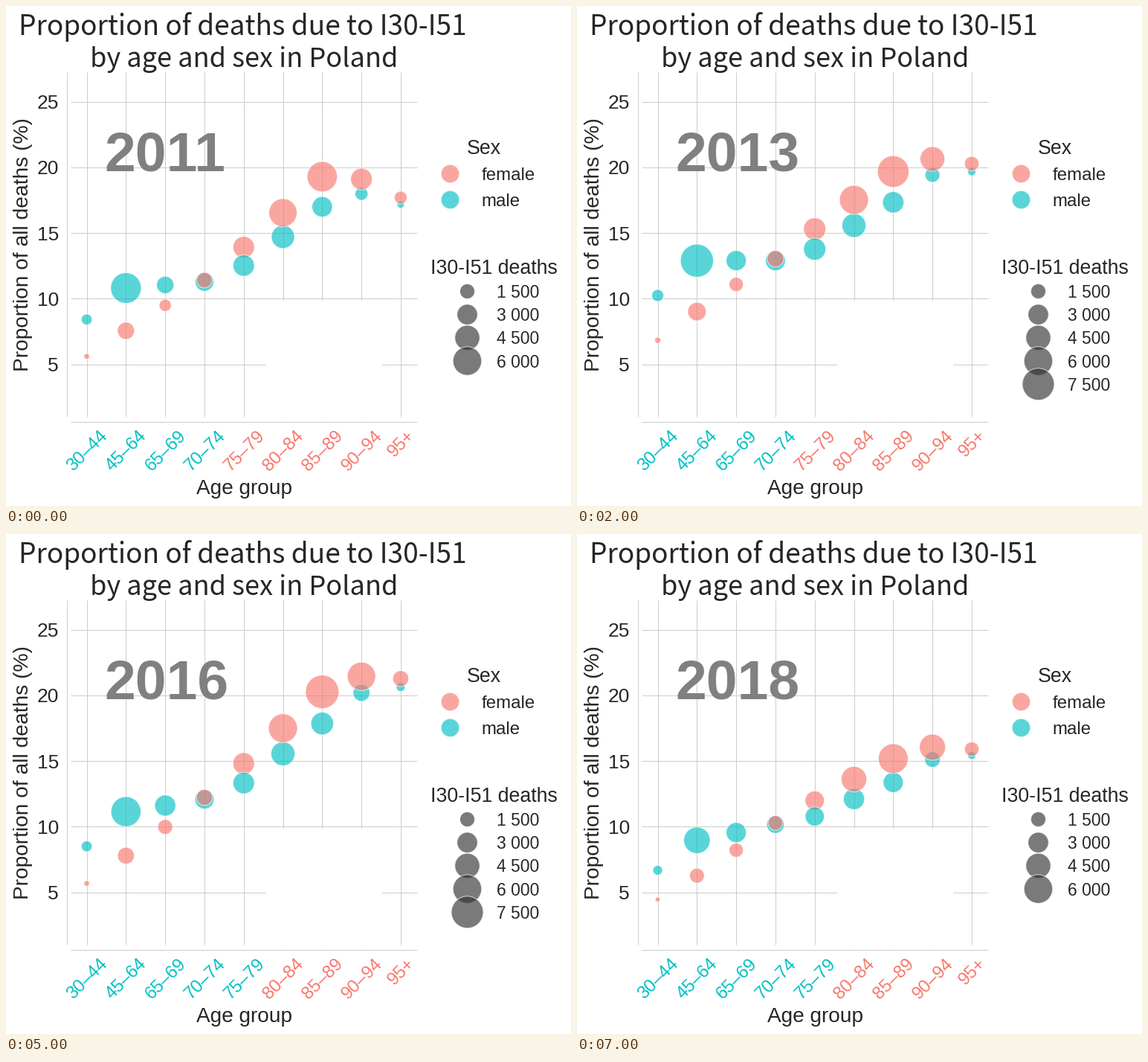
A matplotlib script that plays this animation: 760 px wide and 672 px high, repeating every 8000 ms.

```python
import numpy as np
import matplotlib.pyplot as plt
from matplotlib.animation import FuncAnimation
from matplotlib.patches import Circle, Rectangle

W, H, DPI = 760, 672, 100
PT = 72 / DPI
INK, GRID, GREY = "#262626", "#cccccc", "#808080"
FEMALE, MALE = "#F8766D", "#00BFC4"
ALPHA = 0.65

AGES = ["30–44", "45–64", "65–69", "70–74", "75–79",
        "80–84", "85–89", "90–94", "95+"]
AGE = np.arange(len(AGES))
XS = 108.55 + 52.8 * AGE
MALE_IN_FRONT = AGES.index("75–79")

# Typical share of deaths (%) by age index, straight between key points.
MALE_SHARE = np.interp(AGE, [0, 1, 3, 4, 7, 8],
                       [9.15, 11.8, 12.4, 13.4, 19.2, 19.3])
FEMALE_SHARE = np.interp(AGE, [0, 3, 6, 7, 8], [6.1, 12.55, 19.6, 20.4, 19.9])

# Yearly factor on the typical share, at the ages SWING_AT.
SWING_AT = [0, 3, 6, 8]
SWING = {
    2011: (0.92, 0.91, 0.985, 0.89),
    2012: (1.06, 1.025, 1.04, 1.065),
    2014: (1.18, 1.055, 0.97, 0.975),
    2015: (1.17, 1.22, 1.205, 1.215),
    2016: (0.93, 0.975, 1.035, 1.07),
    2018: (0.73, 0.82, 0.775, 0.80),
}

# Bubble area per share point, and how it grows per year around 2014.
MALE_AREA = np.array([6.3, 37.5, 15.2, 13.8, 16, 16.6, 12.2, 5.5, 1.6])
FEMALE_AREA = np.array([2.5, 16.8, 8.8, 9.5, 14.5, 21.6, 23.5, 14.5, 4.9])
GROWTH = np.array([0, -0.015, 0.065, 0, -0.01, 0, 0.03, 0.08, 0.05])


def swing(year):
    keys = [np.interp(year, list(SWING), k) for k in zip(*SWING.values())]
    return np.interp(AGE, SWING_AT, keys)


def radii(share, area, year):
    return np.sqrt(share * area * (1 + GROWTH * (year - 2014)))


def share_y(share):
    return 569.75 - 17.63 * share


def deaths_to_radius(deaths):
    return np.sqrt(10 + 0.0602 * deaths)


def radius_to_deaths(radius):
    return (radius ** 2 - 10) / 0.0602


fig = plt.figure(figsize=(W / 100, H / 100), dpi=DPI, facecolor="white")
ax = fig.add_axes([0, 0, 1, 1])
ax.set_xlim(0, W)
ax.set_ylim(H, 0)
ax.axis("off")


def text(x, y, s, px, color=INK, font="Liberation Sans", va="baseline", **kw):
    return ax.text(x, y, s, fontsize=px * PT, color=color, family=font,
                   va=va, **kw)


def line(x0, y0, x1, y1):
    ax.plot([x0, x1], [y0, y1], color=GRID, lw=PT, zorder=1,
            solid_capstyle="butt")


def bubble(x, y, r, color):
    return ax.add_patch(Circle((x, y), r, facecolor=color, edgecolor="white",
                               lw=1.1 * PT, alpha=ALPHA, zorder=4))


# Grid, spines and axis labels
for x in XS:
    line(x, 89, x, 551.5)
for share in range(5, 30, 5):
    y = share_y(share)
    line(87, y, 552.5, y)
    text(71, y + 9.3, str(share), 26.4, ha="right")
line(81.5, 89, 81.5, 551.5)
line(87, 558.7, 552.5, 558.7)
ax.add_patch(Rectangle((350, 396), 156, 155.5, color="white", lw=0, zorder=2))

text(318.5, 38.5, "Proportion of deaths due to I30-I51", 37.1,
     font="Noto Sans CJK JP", ha="center")
text(320, 81.5, "by age and sex in Poland", 36.1,
     font="Noto Sans CJK JP", ha="center")
text(320, 656.5, "Age group", 28, ha="center")
text(30, 320.5, "Proportion of all deaths (%)", 28.1, ha="center",
     rotation=90, rotation_mode="anchor")
age_labels = [text(x + 1, 566.5, age, 24, va="top", ha="center", rotation=45)
              for x, age in zip(XS, AGES)]
year_label = text(132.5, 221.3, "", 75, GREY, weight="bold")

# Legends
text(619.5, 199, "Sex", 26.7)
for y, name, color in [(225.5, "female", FEMALE), (260.5, "male", MALE)]:
    bubble(597.5, y, 12.3, color)
    text(639.5, y + 8.5, name, 24)
text(570.6, 360, "I30-I51 deaths", 26.7)

moving = []


def draw_size_legend(peak):
    step = 2000 if peak > 9000 else 1500
    for i, deaths in enumerate(range(step, int(peak) + 1, step)):
        y = 383.5 + 31.2 * i
        moving.append(bubble(620.5, y, deaths_to_radius(deaths), "#333333"))
        label = f"{deaths:,}".replace(",", " ")
        moving.append(text(659.5, y + 8.5, label, 22.9))


def update(frame):
    while moving:
        moving.pop().remove()
    year = 2011 + frame
    year_label.set_text(str(year))

    factor = swing(year)
    male, female = MALE_SHARE * factor, FEMALE_SHARE * factor
    male_r = radii(male, MALE_AREA, year)
    female_r = radii(female, FEMALE_AREA, year)
    male_majority = 5 if year == 2014 or year >= 2016 else 4

    for i, label in enumerate(age_labels):
        pair = [(male[i], male_r[i], MALE), (female[i], female_r[i], FEMALE)]
        if i == MALE_IN_FRONT:
            pair.reverse()
        for share, r, color in pair:
            moving.append(bubble(XS[i], share_y(share), r, color))
        label.set_color(MALE if i < male_majority else FEMALE)

    draw_size_legend(radius_to_deaths(max(*male_r, *female_r)))
    return moving


anim = FuncAnimation(fig, update, frames=8, interval=1000, repeat=True,
                     repeat_delay=0, init_func=lambda: update(0), blit=False)
plt.show()
```
